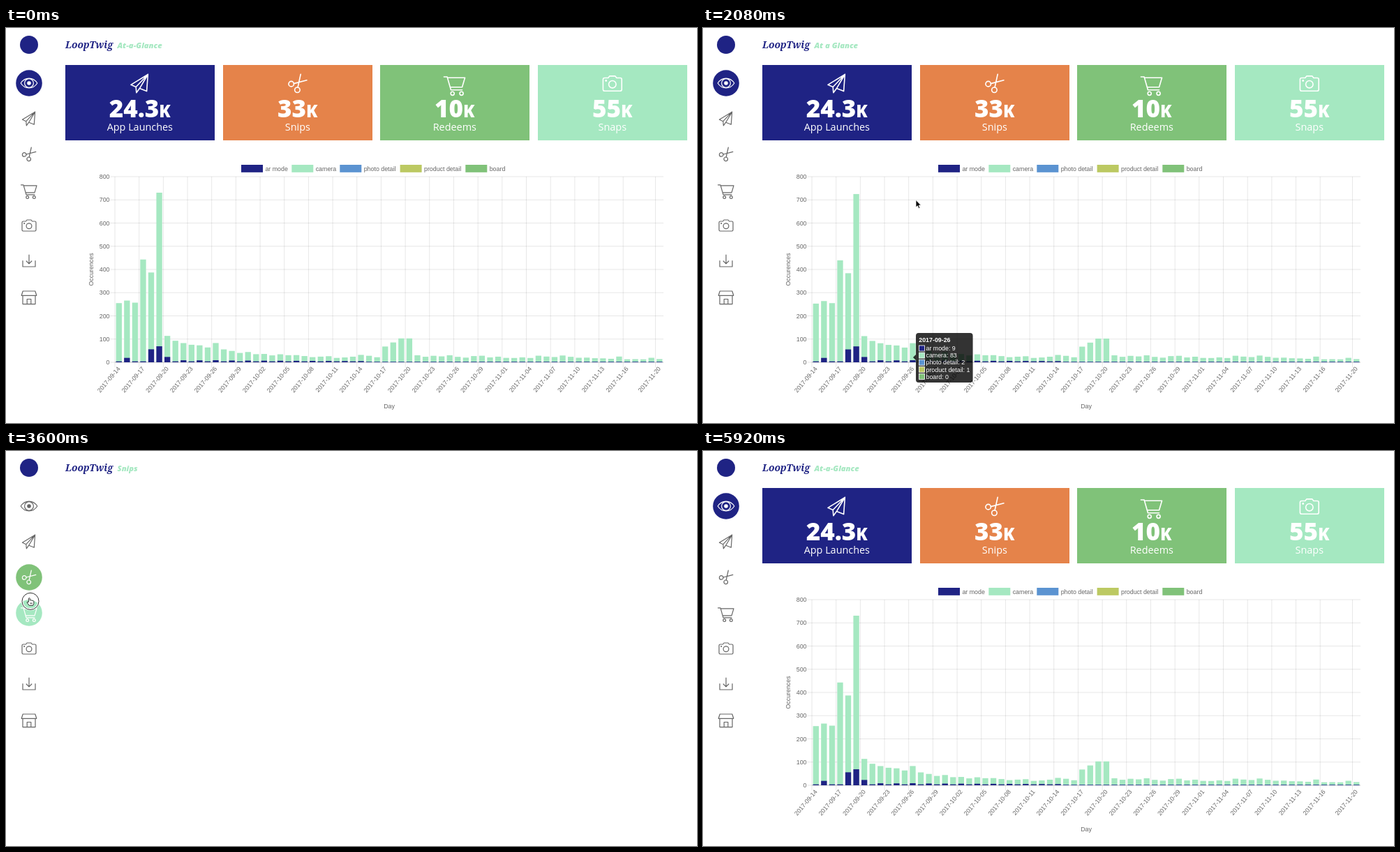
An HTML page that plays this animation: 990 by 566 pixels, repeating every 6.16 s.

```html
<!DOCTYPE html>
<html lang="en">
<head>
<meta charset="utf-8">
<title>Dashboard</title>
<style>
html, body { margin: 0; width: 100%; height: 100%; overflow: hidden; background: #fff; }
svg { display: block; width: 100vw; height: 100vh; }
.open { font-family: "Open Sans", sans-serif; }
.brand { font: italic 900 13.8px "Noto Serif", serif; fill: #1f2384; }
.title { font: italic 800 11.2px "Open Sans", sans-serif; fill: #a5e8c1; }
.chart text, .tip text { font: 8.85px "Liberation Sans", Arial, sans-serif; }
.chart text { fill: #666; }
.tip text { fill: #fff; }
.tip .head { font-weight: bold; }
.icon { fill: none; stroke-linejoin: round; stroke-linecap: round; }
</style>
</head>
<body>
<svg id="stage" viewBox="0 0 990 566" preserveAspectRatio="none"></svg>
<script>
const LOOP = 6160, STEP = 80;
const NAVY = '#1f2384', ORANGE = '#e5834a', GREEN = '#80c279', MINT = '#a5e8c1', BLUE = '#5b93d1', OLIVE = '#bcc962';

const dot = (x, y, r) => `<circle cx="${x}" cy="${y}" r="${r}"/>`;
const line = d => `<path d="${d}"/>`;
const rect = (x, y, w, h, fill) => `<rect x="${x}" y="${y}" width="${w}" height="${h}" fill="${fill}"/>`;
const text = (x, y, s, extra = '') => `<text x="${x}" y="${y}" ${extra}>${s}</text>`;

const icons = {
  eye: line('M-11.8 0C-6-9.3 6-9.3 11.8 0C6 9.3-6 9.3-11.8 0Z') + dot(0, 0, 6.4) +
    '<circle r="2.2" fill="currentColor"/>',
  plane: line('M8.6-9.8L-9.6 1.3L-4.2 3.7L8.6-9.8L7.3 8.2L-.3 5.2L8.6-9.8M-4.2 3.7L-3.7 9.8L-.3 5.2'),
  scissors: dot(-6.8, .4, 2.8) + dot(-.3, 6.8, 2.8) + line('M-4 0L9.8-3.6M.2 4L3.3-10'),
  cart: line('M-11.5-7.2H-8L-4 6.8H8M-7-6.2H11L8 3.8H-5') + dot(-2.3, 10.6, 1.9) + dot(7.3, 10.6, 1.9),
  camera: line('M-8.3-6H-4.5L-3-8H3L4.5-6H8.3Q10-6 10-4.3V6.3Q10 8 8.3 8H-8.3Q-10 8-10 6.3V-4.3Q-10-6-8.3-6Z') +
    dot(0, .8, 3.9) + dot(-6.8, -3, .5),
  download: line('M-9-.5V8H9V-.5M0-9V3.8M-3.8 0L0 3.8L3.8 0'),
  store: line('M-8.8-8H8.8L10.8-1.7H-10.8ZM-9-1.7V10.6H9V-1.7M-2.8 10.6V3.5H2.8V10.6')
};
const icon = (name, x, y, scale, color) =>
  `<g class="icon" transform="translate(${x} ${y}) scale(${scale})" color="${color}" stroke="${color}" stroke-width="1.2">${icons[name]}</g>`;

const navNames = Object.keys(icons);
const navColors = [NAVY, ORANGE, GREEN, MINT, BLUE, OLIVE, NAVY];
const navY = i => 79 + 51 * i;

const cards = [
  ['24.3', 'App Launches', 'plane', NAVY], ['33', 'Snips', 'scissors', ORANGE],
  ['10', 'Redeems', 'cart', GREEN], ['55', 'Snaps', 'camera', MINT]
];
function cardsSvg() {
  return cards.map(([num, label, name, color], i) => {
    const x = Math.round(85 + i * 225.6), mid = x + 106.8;
    return rect(x, 53, 214, 108, color) + icon(name, mid, 79.6, 1.34, '#fff') +
      `<g class="open" fill="#fff" text-anchor="middle">` +
      text(mid, 128.3, `${num}<tspan font-size="24">K</tspan>`, 'font-size="35" font-weight="800"') +
      text(mid, 146.5, label, 'font-size="14.4"') + '</g>';
  }).join('');
}

// Chart: an opening spike, a noisy decay, a bump, then a low tail
const X0 = 156, X1 = 942, TOP = 213, BASE = 479, DAYS = 68;
const COL = (X1 - X0) / DAYS, UNIT = (BASE - TOP) / 800;
const rand = n => { const v = Math.sin(n * 12.9898) * 43758.5453; return v - Math.floor(v); };
const launch = [255, 266, 257, 443, 387, 731];
const spikes = { 1: 19, 4: 56, 5: 69, 6: 23, 12: 9 };

function camera(i) {
  if (i < launch.length) return launch[i];
  if (i === 12) return 83;
  if (i >= 33 && i <= 36) return Math.min(103, 68 + 17.5 * (i - 33));
  const trend = 17 + 88 * Math.exp(-(i - 6) / 5.5) - Math.max(0, i - 56) * .6;
  return trend + 14 * rand(i);
}
const ar = i => spikes[i] ?? (i > 30 ? 2 : i < 7 ? 4 : i % 2 ? 4 : 10 - i / 6);
const series = [
  ['ar mode', NAVY, 337, ar], ['camera', MINT, 409.3, camera], ['photo detail', BLUE, 478.3, () => 2],
  ['product detail', OLIVE, 564.6, () => 1], ['board', GREEN, 658.3, () => 0]
];
const midX = i => X0 + (i + .5) * COL;
const day = i => new Date(Date.UTC(2017, 8, 14 + i)).toISOString().slice(0, 10);

function axesSvg() {
  let lines = '', labels = '';
  for (let v = 0; v <= 800; v += 100) {
    const y = BASE - v * UNIT;
    lines += `M149 ${y}H${X1}`;
    labels += text(148.5, y + 3, v, 'text-anchor="end"');
  }
  for (let i = 0; i < DAYS; i++) {
    if (i !== DAYS - 1 && (i % 3 || i === DAYS - 2)) continue;
    lines += `M${X0 + i * COL} ${TOP}V486`;
    labels += `<text transform="translate(${midX(i)} 486.5) rotate(-50)" y="3" text-anchor="end">${day(i)}</text>`;
  }
  const legend = series.map(([name, color, x]) =>
    rect(x, 196, 31, 10.8, color) + text(x + 34.4, 204.6, name)).join('');
  return `<path d="${lines}" fill="none" stroke="#000" stroke-opacity=".12" stroke-width=".8"/>` +
    `<path d="M${X0} ${BASE}H${X1}" stroke="#000" stroke-opacity=".2" stroke-width=".8"/>` + labels + legend +
    text(549, 544.7, 'Day', 'text-anchor="middle"') +
    '<text transform="translate(125 346) rotate(-90)" text-anchor="middle">Occurences</text>';
}
function barsSvg() {
  const w = COL * .72;
  let out = '';
  for (const [, color, , value] of [series[1], series[2], series[0]])
    for (let i = 0; i < DAYS; i++) {
      const h = value(i) * UNIT;
      out += rect(midX(i) - w / 2, -h, w, h, color);
    }
  return out;
}
function tipSvg(i) {
  const rows = series.map(([name, color, , value], k) =>
    `<rect x="4.5" y="${-17 + k * 10.1}" width="8" height="8" fill="${color}" stroke="#fff" stroke-width=".8"/>` +
    text(14.5, -9.8 + k * 10.1, `${name}: ${Math.round(value(i))}`)).join('');
  return `<g transform="translate(${midX(i) + 4.5} 472)">` +
    '<path d="M4-35H77.6Q81.6-35 81.6-31V32Q81.6 36 77.6 36H4Q0 36 0 32V4L-4 0L0-4V-31Q0-35 4-35Z" opacity=".8"/>' +
    text(4.3, -22, day(i), 'class="head"') + rows + '</g>';
}

const arrow = '<path d="M0 0V10.4L2.4 8.2L4 12L5.8 11.2L4.2 7.6H7.4Z" stroke="#fff" stroke-width=".8"/>';
const hand = '<circle r="11.8" fill="none" stroke="#fff" stroke-width="2.6"/>' +
  '<circle r="12" fill="none" stroke="#333" stroke-width="1"/>' +
  '<path d="M-2.6 1.2V-4.2Q-1.6-5.6-.7-4.2V-1.4Q.4-2.2 1.2-1.2Q2.3-1.8 3-.8Q4.4-1.2 4.8.2V3.2L3.6 6H-1.8L-5 1.6Q-4.4.2-2.6 1.2ZM.2 2V4M2 2V4" fill="#fff" stroke="#333" stroke-width="1" stroke-linejoin="round"/>';

// Pointer stops: time, x, y
const stops = [
  [160, 523, 7], [400, 490, 20], [640, 457, 6], [800, 474, 18], [1200, 470, 78], [1680, 320.5, 112.5],
  [2080, 305, 246.5], [2560, 58, 140], [2880, 35, 131], [3440, 35, 182], [3680, 35, 232], [3920, 35, 232],
  [4320, 34, 103.5], [4640, 33, 69], [4800, 33, 69], [5280, 35, 239], [5680, 530, 7], [5920, 540, 4]
];
function pointer(t) {
  const k = stops.findIndex(s => s[0] > t);
  if (k < 1) return null;
  const [a, ax, ay] = stops[k - 1], [b, bx, by] = stops[k], f = (t - a) / (b - a);
  return [ax + (bx - ax) * f, ay + (by - ay) * f];
}

// Page states: start time, title, active nav item
const pages = [
  [0, 'At-a-Glance', 0], [1360, 'At a Glance', 0], [2960, 'App Launches', 1],
  [3440, 'Snips', 2], [3760, 'Redeems', 3], [4800, 'At-a-Glance', 0]
];
function grow(t) {
  if (t < 1360 || t >= 2960) return 1;
  const f = Math.min(1, Math.max(0, (t - 1480) / 857));
  return 1 - (1 - f) ** 4;
}

const stage = document.getElementById('stage');
stage.innerHTML = '<rect width="990" height="566" fill="#fff"/>' +
  `<circle cx="33" cy="24" r="13" fill="${NAVY}"/>` + text(85, 29.3, 'LoopTwig', 'class="brand"') +
  '<text id="title" class="title" x="159.5" y="28.7"></text><g id="nav"></g>' +
  `<g id="home">${cardsSvg()}<g id="chart" class="chart">${axesSvg()}<g id="bars">${barsSvg()}</g></g></g>` +
  '<g id="tip" class="tip"></g><g id="cursor"></g>';
const [title, navBox, home, chart, bars, tip, cursor] =
  ['title', 'nav', 'home', 'chart', 'bars', 'tip', 'cursor'].map(id => document.getElementById(id));
const show = (node, on) => node.setAttribute('display', on ? 'inline' : 'none');

function draw(t) {
  const [, name, active] = pages.filter(p => p[0] <= t).pop();
  const at = pointer(t), onNav = at && at[0] < 54;
  title.textContent = name;
  navBox.innerHTML = navNames.map((id, i) => {
    const y = navY(i), lit = i === active || (onNav && Math.abs(at[1] - y) < 19);
    return (lit ? `<circle cx="33" cy="${y}" r="18.8" fill="${navColors[i]}"/>` : '') +
      icon(id, 33, y, 1, lit ? '#fff' : '#666');
  }).join('');
  show(home, active === 0);
  show(chart, t < 1360 || t >= 1440);
  bars.setAttribute('transform', `translate(0 ${BASE}) scale(1 ${grow(t)})`);
  const inside = active === 0 && at && at[0] > X0 && at[0] < X1 && at[1] > TOP && at[1] < BASE;
  tip.innerHTML = inside ? tipSvg(Math.floor((at[0] - X0) / COL)) : '';
  cursor.innerHTML = at ? `<g transform="translate(${at[0]} ${at[1]})">${onNav ? hand : arrow}</g>` : '';
}

let last = -1;
function tick() {
  const t = Math.floor(performance.now() % LOOP / STEP) * STEP;
  if (t !== last) draw(last = t);
  requestAnimationFrame(tick);
}
tick();
</script>
</body>
</html>
```
